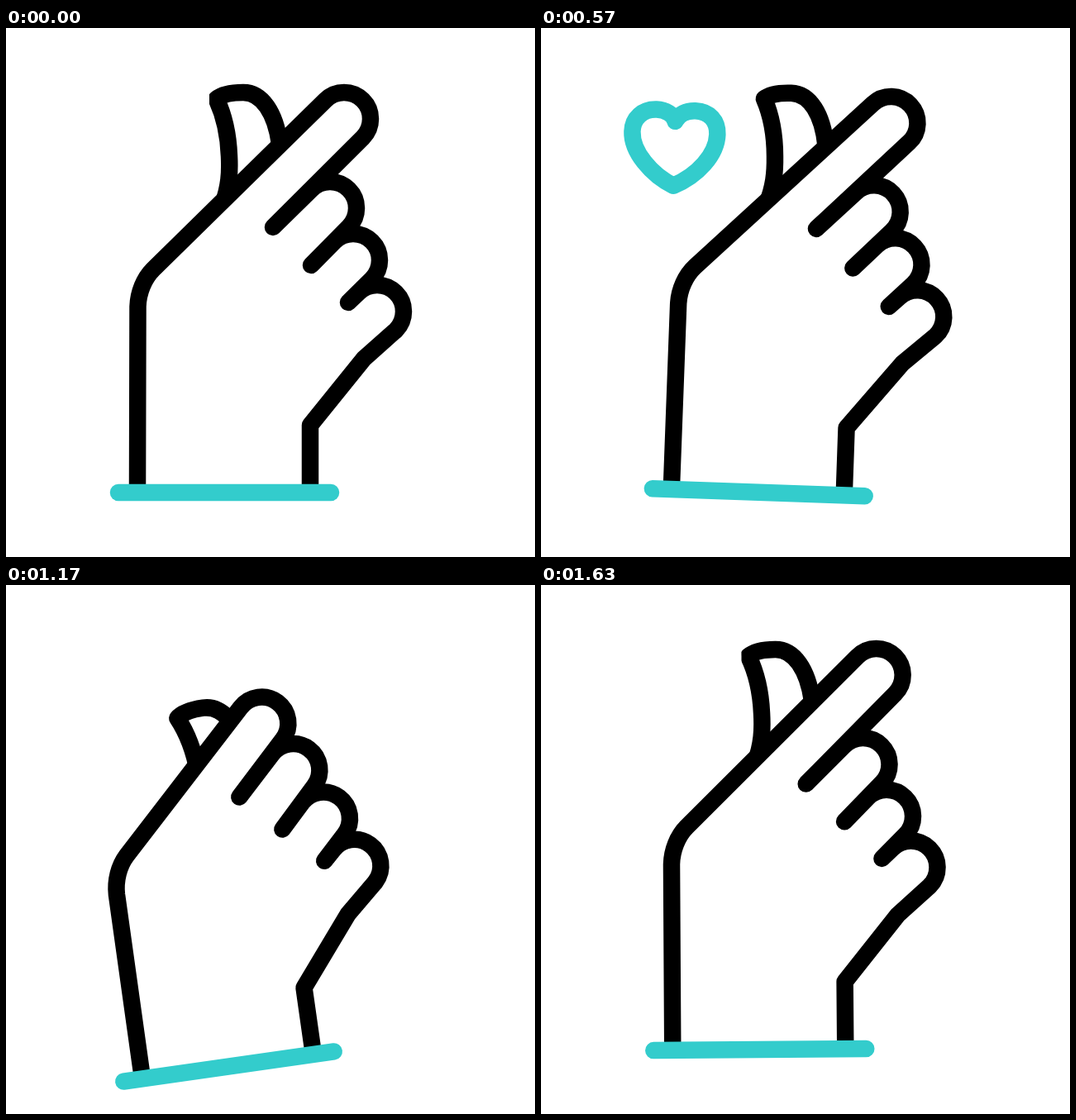
Animation of 640 by 640 pixels, one loop 1.67 s. Source, as an HTML page with a canvas:

```html
<!DOCTYPE html>
<html lang="en">
<head>
<meta charset="utf-8">
<title>Finger heart</title>
<style>
  html, body { margin: 0; width: 100%; height: 100%; overflow: hidden; background: #fff; }
  canvas { display: block; width: 100vmin; height: 100vmin; }
</style>
</head>
<body>
<canvas id="stage"></canvas>
<script>
const SIZE = 640, LOOP = 1670, STEP = 100 / 3;
const TEAL = '#33cccc', INK = '#000';
const PIVOT = { x: 274, y: 527 };

// [step, value] pairs, eased between neighbours
const SWING = [[1.3, 0], [7.7, -9], [14.7, 8], [19.3, -4], [24, 0],
               [27.3, 0], [33.8, -9], [42.3, 8], [46, -4], [49.8, 0]];
const CURL = [[1, 0], [7.7, 1], [12.6, 0], [26.9, 0], [33.8, 1], [38.7, 0]];

const HEART = new Path2D('M148.5 195C122 183 96.5 156 96.5 131C96.5 115 108 103.5 125 103.5' +
  'C136 103.5 146 109 148 117C152 108 161 103.5 172 103.5C189 103.5 199.5 115 199.5 131' +
  'C199.5 156 177 182 148.5 195Z');
const THUMB = new Path2D('M262 214C270 192 271 175 270 155C269 128 264 106 254.5 86' +
  'C262 79.5 274 78 287 78C310 78 326 103 331 140');
const BAR = new Path2D('M136 562H393');

const canvas = document.getElementById('stage');
const ctx = canvas.getContext('2d');
const scale = window.devicePixelRatio || 1;
canvas.width = canvas.height = SIZE * scale;

const clamp = v => Math.max(0, Math.min(1, v));

function track(keys, f) {
  if (f <= keys[0][0]) return keys[0][1];
  for (let i = 1; i < keys.length; i++) {
    const [a, from] = keys[i - 1], [b, to] = keys[i];
    if (f <= b) {
      const s = (f - a) / (b - a);
      return from + (to - from) * s * s * (3 - 2 * s);
    }
  }
  return keys[keys.length - 1][1];
}

function stroke(path, color) {
  ctx.strokeStyle = color;
  ctx.stroke(path);
}

// Knuckle: half circle from its upper-left to its lower-right side
function knuckle(p, x, y, end = Math.PI / 4) {
  p.arc(x, y, 32, -Math.PI * 3 / 4, end);
}

function handPath(curl) {
  const p = new Path2D(), back = 55 * curl;
  p.moveTo(159, 557);
  p.lineTo(159.5, 337);
  p.bezierCurveTo(160, 320, 167, 303, 178, 292);
  knuckle(p, 409 - back, 110 + back);
  p.lineTo(323, 241);
  knuckle(p, 392, 218);
  p.lineTo(369, 287);
  knuckle(p, 420, 281);
  p.lineTo(414, 332);
  knuckle(p, 449, 343, 0.87);
  p.lineTo(433, 400);
  p.lineTo(368, 480.5);
  p.lineTo(368, 557);
  return p;
}

function drawThumb(curl, angle) {
  ctx.save();
  if (Math.abs(angle) < 1) {
    ctx.beginPath();
    ctx.rect(246, 0, SIZE, SIZE);
    ctx.clip();
  }
  ctx.translate(9 * curl, 59 * curl);
  stroke(THUMB, INK);
  ctx.restore();
}

function pose(angle, x, y) {
  ctx.translate(PIVOT.x + x, PIVOT.y + y);
  ctx.rotate(angle * Math.PI / 180);
  ctx.translate(-PIVOT.x, -PIVOT.y);
}

function draw(f) {
  const angle = track(SWING, f), curl = track(CURL, f), drop = 23 * curl;
  ctx.setTransform(scale, 0, 0, scale, 0, 0);
  ctx.fillStyle = '#fff';
  ctx.fillRect(0, 0, SIZE, SIZE);
  ctx.lineWidth = 20.5;
  ctx.lineCap = ctx.lineJoin = 'round';

  ctx.save();
  pose(angle, 0, drop);
  drawThumb(curl, angle);
  const hand = handPath(curl);
  ctx.fill(hand);
  stroke(hand, INK);
  stroke(BAR, TEAL);
  ctx.restore();

  const fade = clamp((f - 27.3) / 7);
  const alpha = clamp((f - 8) / 2) * (1 - fade);
  if (alpha > 0) {
    ctx.save();
    ctx.globalAlpha = alpha;
    pose(angle, 0, drop - 50 * fade);
    stroke(HEART, TEAL);
    ctx.restore();
  }
}

let start = null;
function tick(now) {
  if (start === null) start = now;
  const t = Math.max(0, now - start) % LOOP;
  draw(Math.min(49, Math.floor((t + 9.9) / STEP)));
  requestAnimationFrame(tick);
}
draw(0);
requestAnimationFrame(tick);
</script>
</body>
</html>
```
